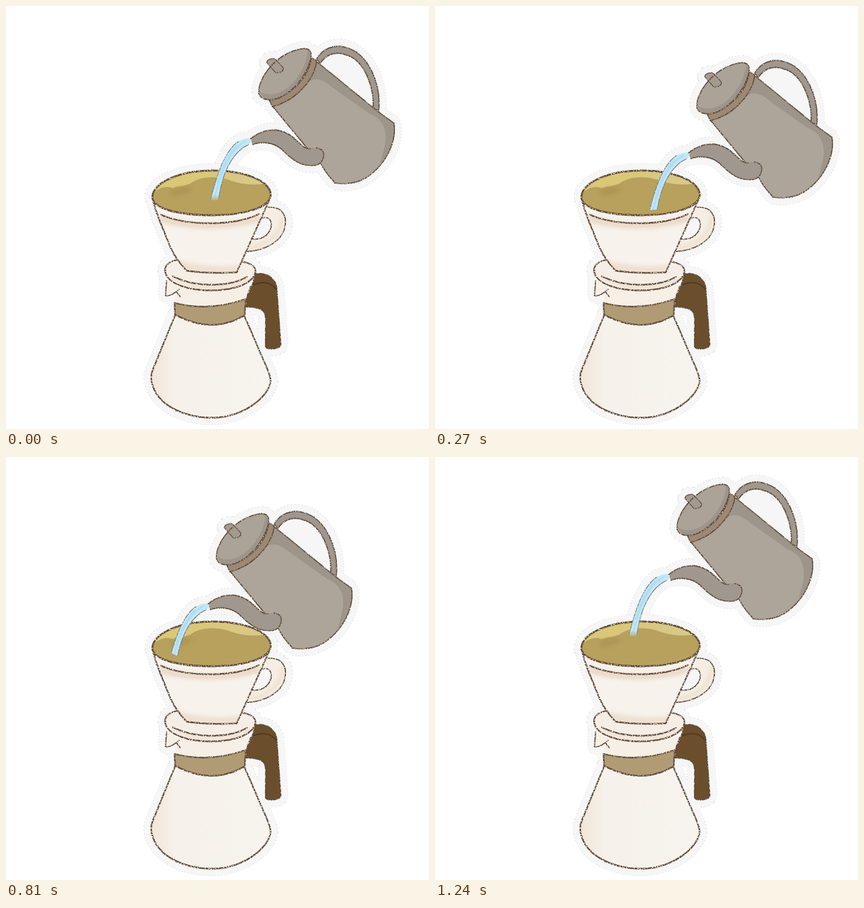
Recreate the animation shown at these times as an HTML page. Size 748 by 748 pixels, loop 1350 ms.

```html
<!DOCTYPE html>
<html lang="en">
<head>
<meta charset="utf-8">
<title>Pour-over coffee</title>
<style>
  html, body { margin: 0; width: 100%; height: 100%; overflow: hidden; background: #fff; }
  svg { display: block; width: 100vw; height: 100vh; }
  .edge { fill: none; stroke: #d3d4d3; stroke-width: 26.5; stroke-dasharray: 2 3; stroke-linejoin: round; }
  .halo { fill: #f5f6f5; stroke: #f5f6f5; stroke-width: 25; stroke-linejoin: round; }
  .ink { fill: none; stroke: #5f4a39; stroke-width: 2.8; stroke-linecap: round; stroke-linejoin: round; filter: url(#crayon); }
  .fine { stroke-width: 2.1; }
  .soft { filter: url(#blur); }
</style>
</head>
<body>
<svg viewBox="0 0 748 748">
  <defs>
    <filter id="crayon" filterUnits="userSpaceOnUse" x="0" y="0" width="748" height="748" color-interpolation-filters="sRGB">
      <feTurbulence type="fractalNoise" baseFrequency=".45" numOctaves="2" seed="4" result="noise"/>
      <feDisplacementMap in="SourceGraphic" in2="noise" scale="1.6" xChannelSelector="R" yChannelSelector="G" result="rough"/>
      <feColorMatrix in="noise" values="0 0 0 0 0  0 0 0 0 0  0 0 0 0 0  0 0 6 0 -1.9" result="grain"/>
      <feComposite in="rough" in2="grain" operator="in"/>
    </filter>
    <filter id="blur" x="-20%" y="-50%" width="140%" height="200%" color-interpolation-filters="sRGB"><feGaussianBlur stdDeviation="3"/></filter>
    <linearGradient id="glass">
      <stop offset="0" stop-color="#f1e5d7"/>
      <stop offset=".2" stop-color="#f6f1ea"/>
      <stop offset="1" stop-color="#f7f3ee"/>
    </linearGradient>
    <linearGradient id="foam">
      <stop offset=".4" stop-color="#dac778"/>
      <stop offset=".8" stop-color="#d8c889"/>
    </linearGradient>
    <linearGradient id="fade" gradientUnits="userSpaceOnUse" x1="0" y1="334" x2="0" y2="346">
      <stop offset="0" stop-color="#fff"/>
      <stop offset="1" stop-color="#fff" stop-opacity="0"/>
    </linearGradient>
    <mask id="sink" maskUnits="userSpaceOnUse" x="340" y="220" width="110" height="140">
      <path d="M340 220H450V360H340Z" fill="url(#fade)"/>
    </mask>
    <!-- Water disappears at the front edge of the coffee -->
    <clipPath id="pool"><path d="M0 0H748V330H445A82 32 0 0 1 281 330H0Z"/></clipPath>

    <path id="rim" d="M259 340C256 316 301 291 364 291C430 291 470 313 468 335C466 357 420 370 364 370C310 370 262 360 259 340Z"/>
    <path id="cone" d="M259 338C264 362 278 394 288 420C296 441 307 454 319 468Q362 474 408 471L467 338Z"/>
    <path id="ear" d="M460 356C484 354 496 366 494 386C491 415 460 432 427 434L436 412Z"/>
    <path id="plate" d="M302 449C285 453 279 461 282 472C287 491 322 503 362 503C408 503 442 488 441 467C439 457 428 455 418 452Z"/>
    <path id="neck" d="M284 484L282 513Q293 513 301 506L298 526Q360 541 424 519L433 493Q362 512 284 484Z"/>
    <path id="band" d="M298 525Q360 541 424 518L422 547Q365 581 299 546Z"/>
    <path id="grip" d="M440 474C458 470 478 479 479 502L486 599C486 606 464 609 459 603V552C459 536 448 533 425 532L427 511Q437 496 440 474Z"/>
    <path id="flask" d="M299 546L260 642C255 654 256 664 260 673C272 708 318 728 364 728C417 728 463 694 468 664C468 654 464 646 460 637L422 547Q365 581 299 546Z"/>
    <g id="brewer">
      <use href="#rim"/><use href="#cone"/><use href="#ear"/><use href="#plate"/>
      <use href="#neck"/><use href="#grip"/><use href="#flask"/>
    </g>

    <path id="lid" d="M447 153C446 127 478 82 526 75C541 75 542 86 537 100C528 128 502 158 475 165C456 168 447 161 447 153Z"/>
    <path id="knob" d="M461 100Q462 93 473 93Q476 93 479 97L490 109Q492 113 487 116Q479 120 476 117Z"/>
    <path id="collar" d="M540 91L549 97C548 126 515 167 471 178L466 167C505 160 535 125 540 91Z"/>
    <path id="body" d="M472 178C515 166 548 126 549 98L657 186L686 207C691 241 672 280 638 303C620 314 600 316 582 313Q564 294 556 273L533 252Z"/>
    <path id="loop" d="M549 94C559 76 580 67 600 73C640 82 664 137 659 186L649 180C652 147 635 95 600 86C585 80 567 84 556 101Z"/>
    <path id="spout" d="M432 235C452 219 476 213 500 227C518 237 524 254 538 252C552 247 564 257 562 266C561 276 553 282 544 282C520 284 505 270 492 258C480 244 458 237 436 245Z"/>
    <path id="water" d="M434 236C430 233 420 234 412 239C390 252 374 292 362 342Q369 346 376 342C381 302 397 260 429 245Q435 241 434 236Z"/>
    <g id="pot">
      <use href="#lid"/><use href="#knob"/><use href="#body"/><use href="#collar"/>
      <use href="#loop"/><use href="#spout"/><use href="#water"/>
    </g>
    <clipPath id="inBody"><use href="#body"/></clipPath>
    <clipPath id="inLid"><use href="#lid"/></clipPath>
    <clipPath id="inCone"><use href="#cone"/></clipPath>
    <clipPath id="inRim"><use href="#rim"/></clipPath>
  </defs>

  <g class="moving">
    <use href="#pot" class="edge"/>
    <use href="#pot" class="halo"/>
    <path d="M556 101C567 84 585 80 600 86C635 95 652 147 649 180Z" fill="#f5f6f5"/>
  </g>
  <use href="#brewer" class="edge"/>
  <use href="#brewer" class="halo"/>

  <!-- Carafe -->
  <use href="#flask" fill="url(#glass)"/>
  <use href="#neck" fill="#f6efe6"/>
  <use href="#grip" fill="#6b4e2c"/>
  <path d="M437 493C455 486 471 489 478 502" fill="none" stroke="#4f381f" stroke-width="2"/>
  <use href="#band" fill="#b09b75"/>
  <use href="#plate" fill="#f6eee5"/>
  <path d="M286 478Q320 501 364 501Q420 500 438 478Q400 493 364 493Q320 493 286 478Z" fill="#f0e5d9"/>
  <g class="ink">
    <path d="M299 547L260 642C255 654 256 664 260 673C272 708 318 728 364 728C417 728 463 694 468 664C468 654 464 646 460 637L422 549"/>
    <use href="#band"/>
    <path d="M302 449C285 453 279 461 282 472C287 491 322 503 362 503C408 503 442 488 441 467C439 457 428 455 418 452"/>
    <path d="M295 478Q325 493 365 493Q405 492 426 479M433 496L425 519"/>
    <path d="M284 486L282 513Q293 513 306 501M302 506L308 514" class="fine"/>
    <use href="#grip" class="fine"/>
  </g>

  <!-- Dripper -->
  <use href="#ear" fill="#f6eee4"/>
  <path d="M489 370C490 402 464 422 432 428" fill="none" stroke="#eddfce" stroke-width="6" class="soft"/>
  <path d="M454 375C465 371 470 380 469 390C465 407 450 414 436 412Z" fill="#f5f6f5"/>
  <use href="#cone" fill="#f7f2ec"/>
  <g clip-path="url(#inCone)">
    <path d="M270 369Q360 399 452 368L446 382Q360 405 274 383Z" fill="#ead9c7" class="soft"/>
    <path d="M298 448Q360 466 420 457L408 474H315Z" fill="#eee0d1" class="soft"/>
  </g>
  <use href="#rim" fill="#b7a15d"/>
  <g clip-path="url(#inRim)">
    <path d="M250 280H480V310Q464 312 452 315C430 317 411 314 393 307C370 300 343 301 326 314C315 319 304 318 295 322C283 317 270 321 258 333Z" fill="url(#foam)"/>
    <path d="M289 328Q309 318 330 321Q325 333 296 336Z" fill="#a99250" opacity=".7" class="soft"/>
  </g>
  <g class="ink">
    <use href="#rim" stroke-width="3.4"/>
    <path d="M260 343C264 364 278 394 288 420C296 441 307 454 319 468Q362 474 408 471L466 342"/>
    <path d="M274 369C315 389 405 390 447 368"/>
    <path d="M462 356C484 354 496 366 494 386C491 415 460 432 427 434M454 375C465 371 470 380 469 390C465 407 450 414 436 412" class="fine"/>
  </g>

  <!-- Kettle -->
  <g class="moving">
    <use href="#loop" fill="#a0978e"/>
    <use href="#body" fill="#ada49a"/>
    <path clip-path="url(#inBody)" d="M474 178Q508 165 529 139C545 124 559 129 576 143L642 190C672 202 677 228 666 262L660 288L700 240V200L549 90L470 170Z" fill="#9d948a"/>
    <use href="#collar" fill="#9d8973"/>
    <use href="#lid" fill="#aba298"/>
    <path clip-path="url(#inLid)" d="M445 148C461 162 483 157 502 141C521 123 533 99 534 76L550 80L530 150L465 175Z" fill="#9d948a"/>
    <use href="#knob" fill="#a39a90"/>
    <use href="#spout" fill="#a0978e"/>
    <g class="ink fine">
      <use href="#loop"/>
      <path d="M472 178L533 252M549 98L657 186L686 207C691 241 672 280 638 303C620 314 600 316 582 313Q564 294 556 277"/>
      <use href="#collar"/><use href="#lid"/><use href="#knob" stroke-width="1.6"/>
      <path d="M432 235C452 219 476 213 500 227C518 237 524 254 538 252M548 251C560 251 564 261 561 269C558 277 552 282 544 282C520 284 505 270 492 258C480 244 458 237 436 245"/>
    </g>
  </g>
  <g clip-path="url(#pool)">
    <g class="moving">
      <g mask="url(#sink)">
        <use href="#water" fill="#c3e7f5"/>
        <path d="M424 239C394 253 380 296 369 338M409 246C390 266 380 293 374 315" fill="none" stroke="#b1ddf2" stroke-width="3"/>
        <path d="M412 239C390 252 374 292 362 342M376 341C381 302 397 260 429 245" class="ink" style="stroke:#71858c;stroke-width:1.6"/>
      </g>
    </g>
  </g>
</svg>
<script>
  const HOLD = 270;
  const POSES = [[0, 0], [16, 25], [-31, 18], [-75, 25], [-19, -27]];
  const parts = document.querySelectorAll('.moving');

  function draw() {
    const pose = POSES[Math.floor(performance.now() / HOLD) % POSES.length];
    parts.forEach(part => part.setAttribute('transform', `translate(${pose})`));
    requestAnimationFrame(draw);
  }
  draw();
</script>
</body>
</html>
```
